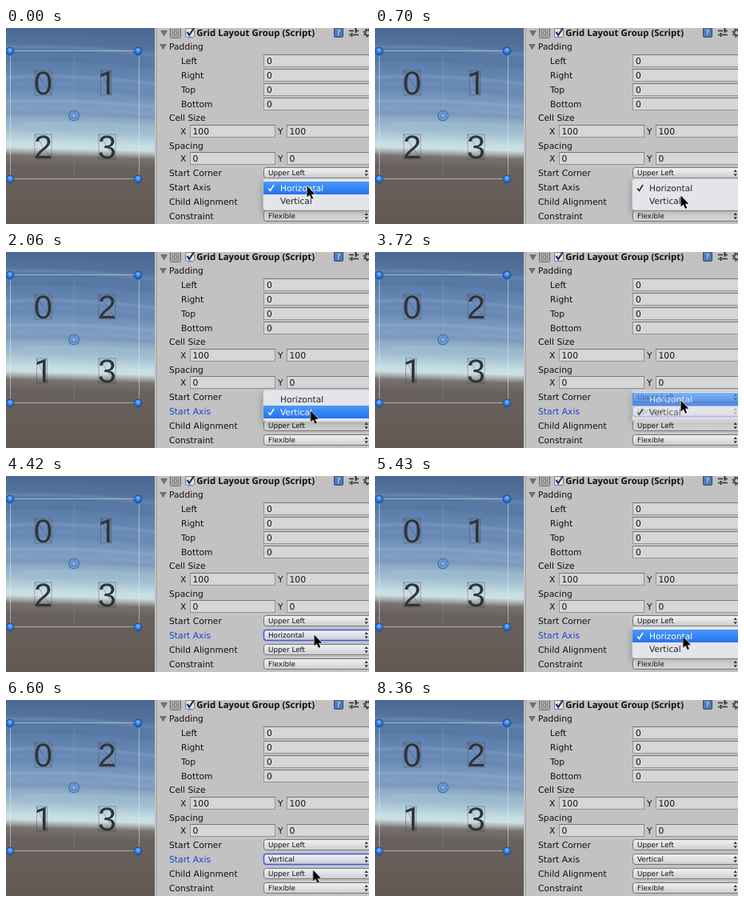
An HTML page that plays this animation: 454 by 245 pixels, repeating every 8.41 s.

```html
<!DOCTYPE html>
<html lang="en">
<head>
<meta charset="utf-8">
<title>Grid layout start axis</title>
<style>
html, body { margin: 0; width: 100%; height: 100%; overflow: hidden; background: #c2c2c2; }
svg { display: block; }
text { font: 10.75px "DejaVu Sans", sans-serif; fill: #111; text-rendering: geometricPrecision; }
.title { font: bold 11.4px "Open Sans", sans-serif; }
.small text, text.small { font-size: 8.8px; }
.digits text { font: 41px "Liberation Sans", Arial, sans-serif; fill: #323334; text-anchor: middle; }
.digits .one { font-family: Roboto, sans-serif; }
.wire { fill: none; stroke: #26323f; stroke-opacity: .42; stroke-width: .8; }

/* One loop is 8410 ms; percentages are time / 84.1 */
.horizontal, .vertical, .focus, #axis, #menu, .sheet, #glow, #rowH, #rowV, #check, #cursor {
  animation: 8410ms step-end infinite;
}
.horizontal { animation-name: horizontal; }
.vertical { animation-name: vertical; }
.focus { animation-name: focus; }
#axis { animation-name: axis; }
#menu { animation-name: menu; }
.sheet { animation-name: sheet; }
#glow { animation-name: glow; }
#rowH { animation-name: rowH; }
#rowV { animation-name: rowV; }
#check { animation-name: check; }
#cursor { animation-name: cursor; }
#menu text { font-size: 10.6px; }

@keyframes horizontal {
  0%, 46.254% { opacity: 1; }
  12.485%, 78.478%, 100% { opacity: 0; }
}
@keyframes vertical {
  0%, 46.254% { opacity: 0; }
  12.485%, 78.478%, 100% { opacity: 1; }
}
@keyframes focus {
  0%, 99.405%, 100% { opacity: 0; }
  12.485% { opacity: 1; }
}
@keyframes axis {
  0%, 99.405%, 100% { fill: #111; }
  12.485% { fill: #1746d2; }
}
@keyframes menu {
  0%, 24.494%, 57.550% { opacity: 1; }
  9.750%, 43.519%, 75.743% { opacity: .93; }
  10.463%, 44.233%, 76.456% { opacity: .7; }
  11.177%, 44.946%, 77.170% { opacity: .35; }
  77.764% { opacity: .14; }
  12.485%, 46.254%, 78.478%, 100% { opacity: 0; }
}
@keyframes sheet {
  0%, 46.254%, 100% { transform: translateY(0); }
  12.485% { transform: translateY(-16px); }
}
@keyframes glow {
  0%, 12.485%, 46.254% { transform: translateY(0); opacity: 1; }
  3.894%, 9.036%, 66.635%, 75.029%, 100% { transform: translateY(16px); opacity: 1; }
  8.323%, 74.316% { transform: translateY(16px); opacity: 0; }
  32.897%, 42.806% { transform: translateY(-16px); opacity: 1; }
  42.092% { transform: translateY(-16px); opacity: 0; }
}
@keyframes rowH {
  0%, 32.897%, 42.806%, 46.254% { fill: #fff; }
  3.894%, 42.092%, 66.635%, 100% { fill: #222; }
}
@keyframes rowV {
  0%, 8.323%, 32.897%, 46.254%, 74.316% { fill: #222; }
  3.894%, 9.036%, 12.485%, 66.635%, 75.029%, 100% { fill: #fff; }
}
@keyframes check {
  0%, 12.485%, 46.254% { stroke: #fff; }
  3.894%, 32.897%, 66.635%, 100% { stroke: #222; }
}
@keyframes cursor {
  0% { transform: translate(376px, 197px); }
  1.307% { transform: translate(376px, 197px); animation-timing-function: steps(4, jump-both); }
  4.756% { transform: translate(382px, 209px); }
  18.192% { transform: translate(382px, 209px); animation-timing-function: steps(4, jump-both); }
  21.640% { transform: translate(380.5px, 198px); }
  32.223% { transform: translate(380.5px, 198px); animation-timing-function: steps(3, jump-both); }
  34.244% { transform: translate(382px, 185px); }
  49.821% { transform: translate(382px, 185px); animation-timing-function: steps(4, jump-both); }
  52.556% { transform: translate(385px, 198px); }
  63.971% { transform: translate(385px, 198px); animation-timing-function: steps(5, jump-both); }
  67.300% { transform: translate(383.5px, 212px); }
  84.898% { transform: translate(383.5px, 212px); animation-timing-function: steps(5, jump-both); }
  88.347%, 100% { transform: translate(392px, 248px); }
}
</style>
</head>
<body>
<svg width="454" height="245" viewBox="0 0 454 245">
  <defs>
    <linearGradient id="sky" gradientUnits="userSpaceOnUse" x1="0" y1="0" x2="-7" y2="245">
      <stop offset="0" stop-color="#4b6993"/>
      <stop offset=".14" stop-color="#587aa6"/>
      <stop offset=".3" stop-color="#6c8db8"/>
      <stop offset=".43" stop-color="#84a2c2"/>
      <stop offset=".52" stop-color="#a3c0d1"/>
      <stop offset=".58" stop-color="#c5dde4"/>
      <stop offset=".605" stop-color="#cde0e2"/>
      <stop offset=".625" stop-color="#a9b1b1"/>
      <stop offset=".648" stop-color="#777271"/>
      <stop offset=".7" stop-color="#69615d"/>
      <stop offset="1" stop-color="#625853"/>
    </linearGradient>
    <linearGradient id="button" x2="0" y2="1">
      <stop offset="0" stop-color="#f2f2f2"/>
      <stop offset="1" stop-color="#cecece"/>
    </linearGradient>
    <linearGradient id="active" x2="0" y2="1">
      <stop offset="0" stop-color="#f2f3f8"/>
      <stop offset="1" stop-color="#c9ccdc"/>
    </linearGradient>
    <linearGradient id="blue" x2="0" y2="1">
      <stop offset="0" stop-color="#4a9af8"/>
      <stop offset="1" stop-color="#2472f0"/>
    </linearGradient>
    <radialGradient id="bead" cy=".35">
      <stop offset="0" stop-color="#8cc4ff"/>
      <stop offset=".55" stop-color="#3c86e4"/>
      <stop offset="1" stop-color="#2260bd"/>
    </radialGradient>
    <filter id="shade" x="-10%" y="-40%" width="120%" height="200%">
      <feDropShadow dx="0" dy="4" stdDeviation="4" flood-opacity=".3"/>
    </filter>
    <filter id="haze" x="-10%" y="-10%" width="120%" height="120%">
      <feGaussianBlur stdDeviation="7 1.3"/>
    </filter>
    <clipPath id="view"><path d="M0 0H186V245H0z"/></clipPath>
    <circle id="dot" r="4.9" fill="url(#bead)" stroke="#1d4e97"/>
    <path id="quad" class="wire" d="M-10.5-15.5h21v31h-21zl21 31"/>
    <path id="slim" class="wire" d="M-8-15.500h13v31h-13zl13 31"/>
    <path id="fold" d="M0 0h9l-4.500 7.500z" fill="#707070"/>
    <g id="field">
      <rect x=".5" y=".5" width="140" height="15" fill="#d6d6d6" stroke="#959595"/>
      <path d="M0 .5h141" stroke="#737373"/>
    </g>
    <g id="half">
      <rect x=".5" y=".5" width="106" height="15" fill="#d6d6d6" stroke="#959595"/>
      <path d="M0 .5h107" stroke="#737373"/>
    </g>
    <path id="arrows" d="M126.500 6l2.200-3 2.200 3zM126.500 8.200l2.200 3 2.200-3z" fill="#333"/>
    <g id="popup">
      <rect x=".5" y=".5" width="140" height="13" rx="3" fill="url(#button)" stroke="#757575"/>
      <use href="#arrows"/>
    </g>
  </defs>

  <!-- Scene view -->
  <rect width="186" height="245" fill="url(#sky)"/>
  <g clip-path="url(#view)" fill="none" stroke-width="4">
    <path d="M-10 24Q90 20 200 36M-10 62Q90 56 200 72M-10 92Q90 88 200 100M20 120Q110 117 200 126" stroke="#d5e4f2" stroke-opacity=".13" filter="url(#haze)"/>
    <path d="M-10 40Q90 36 200 50M-10 76Q90 71 200 86M-10 107Q90 104 200 114" stroke="#35557f" stroke-opacity=".13" filter="url(#haze)"/>
  </g>
  <path d="M85 30V188" stroke="#dfe9f2" stroke-opacity=".15"/>
  <path d="M5.5 28.5h161v160h-161z" fill="none" stroke="#e4ebf0" stroke-opacity=".55"/>
  <use href="#dot" x="5" y="29"/>
  <use href="#dot" x="165" y="29"/>
  <use href="#dot" x="5" y="189"/>
  <use href="#dot" x="165" y="189"/>
  <circle cx="85" cy="109.5" r="6.3" fill="#6f9fdb" stroke="#4375b8" stroke-width="1.4"/>
  <circle cx="85" cy="109.5" r="3.2" fill="#8fa9c6" stroke="#4375b8"/>

  <g class="digits">
    <use href="#quad" x="46.5" y="68.5"/><text x="46.5" y="82.5">0</text>
    <use href="#quad" x="126.5" y="148.5"/><text x="126.5" y="162.5">3</text>
    <g class="horizontal">
      <use href="#slim" x="126.5" y="68.5"/><text class="one" x="126.5" y="82.5">1</text>
      <use href="#quad" x="46.5" y="148.5"/><text x="46.5" y="162.5">2</text>
    </g>
    <g class="vertical">
      <use href="#quad" x="126.5" y="68.5"/><text x="126.5" y="82.5">2</text>
      <use href="#slim" x="46.5" y="148.5"/><text class="one" x="46.5" y="162.5">1</text>
    </g>
  </g>

  <!-- Inspector -->
  <rect x="186" width="268" height="245" fill="#c2c2c2"/>
  <path d="M188.5 0V245" stroke="#a0a0a0"/>
  <use href="#fold" x="193" y="3"/>
  <g stroke="#6c6c6c">
    <rect x="205.5" y="-.5" width="13" height="13" rx="1" fill="#b4b4b4"/>
    <path d="M208 2h3v3h-3zM213 2h3v3h-3zM208 7h3v3h-3zM213 7h3v3h-3z" fill="#d8d8d8"/>
  </g>
  <rect x="224.5" y=".5" width="11" height="11" rx="2" fill="#e6e9f0" stroke="#70747c"/>
  <path d="M226.5 5l2.700 4 5.800-9" fill="none" stroke="#1b3768" stroke-width="2.300"/>
  <text class="title" x="238.2" y="10">Grid Layout Group (Script)</text>
  <rect x="410.5" y="-.5" width="11" height="12" rx="1" fill="#4d7ab4" stroke="#2c4a75"/>
  <text class="small" x="413.5" y="9" style="fill:#fff">?</text>
  <path d="M429 3.500h6M438 3.500h3M429 8.500h2M434 8.500h7" stroke="#333" stroke-width="1.500"/>
  <path d="M437.500 0v6M432.500 6v5" stroke="#333" stroke-width="2"/>
  <circle cx="452.5" cy="6" r="3.300" fill="none" stroke="#444" stroke-width="2"/>
  <circle cx="452.5" cy="6" r="5" fill="none" stroke="#444" stroke-width="1.600" stroke-dasharray="2 1.930"/>

  <use href="#fold" x="192" y="20"/>
  <text x="204" y="27">Padding</text>
  <text x="219" y="45">Left</text>
  <text x="219" y="63">Right</text>
  <text x="219" y="81">Top</text>
  <text x="219" y="99">Bottom</text>
  <use href="#field" x="322" y="33"/><text x="326" y="45">0</text>
  <use href="#field" x="322" y="51"/><text x="326" y="63">0</text>
  <use href="#field" x="322" y="69"/><text x="326" y="81">0</text>
  <use href="#field" x="322" y="87"/><text x="326" y="99">0</text>

  <text x="204" y="116">Cell Size</text>
  <text x="218" y="133">X</text>
  <use href="#half" x="230" y="121"/><text x="233.5" y="133">100</text>
  <text x="340" y="133">Y</text>
  <use href="#field" x="351" y="121"/><text x="354.5" y="133">100</text>
  <text x="204" y="151">Spacing</text>
  <text x="218" y="167">X</text>
  <use href="#half" x="230" y="155"/><text x="233.5" y="167">0</text>
  <text x="340" y="167">Y</text>
  <use href="#field" x="351" y="155"/><text x="354.5" y="167">0</text>

  <text x="204" y="185">Start Corner</text>
  <text id="axis" x="204" y="203">Start Axis</text>
  <text x="204" y="221">Child Alignment</text>
  <text x="204" y="239">Constraint</text>
  <use href="#popup" x="322" y="174"/>
  <use href="#popup" x="322" y="192"/>
  <use href="#popup" x="322" y="210"/>
  <use href="#popup" x="322" y="228"/>
  <g class="focus">
    <rect x="322.5" y="192.5" width="140" height="13" rx="3" fill="url(#active)" stroke="#3f56d6" stroke-width="1.400"/>
    <use href="#arrows" x="322" y="192"/>
  </g>
  <g class="small">
    <text x="328" y="184">Upper Left</text>
    <text class="horizontal" x="328" y="202">Horizontal</text>
    <text class="vertical" x="328" y="202">Vertical</text>
    <text x="328" y="220">Upper Left</text>
    <text x="328" y="238">Flexible</text>
  </g>

  <!-- Drop-down -->
  <g id="menu">
    <g class="sheet">
      <rect x="321.5" y="188" width="160" height="40" rx="4" fill="#e3e5eb" stroke="#b2b2b6" stroke-width=".6" filter="url(#shade)"/>
    </g>
    <rect id="glow" x="322" y="192" width="160" height="16" fill="url(#blue)"/>
    <g class="sheet">
      <text id="rowH" x="343" y="204">Horizontal</text>
      <text id="rowV" x="343" y="220">Vertical</text>
    </g>
    <path id="check" d="M328 200.500l2.500 3 4.500-7.500" fill="none" stroke-width="1.500"/>
  </g>

  <path id="cursor" d="M.5.5V14.500L3.700 11.500 6 16.800 8.200 15.900 6 10.700H10.400z" fill="#000" stroke="#fff" stroke-width="1.100" paint-order="stroke"/>
</svg>
</body>
</html>
```
